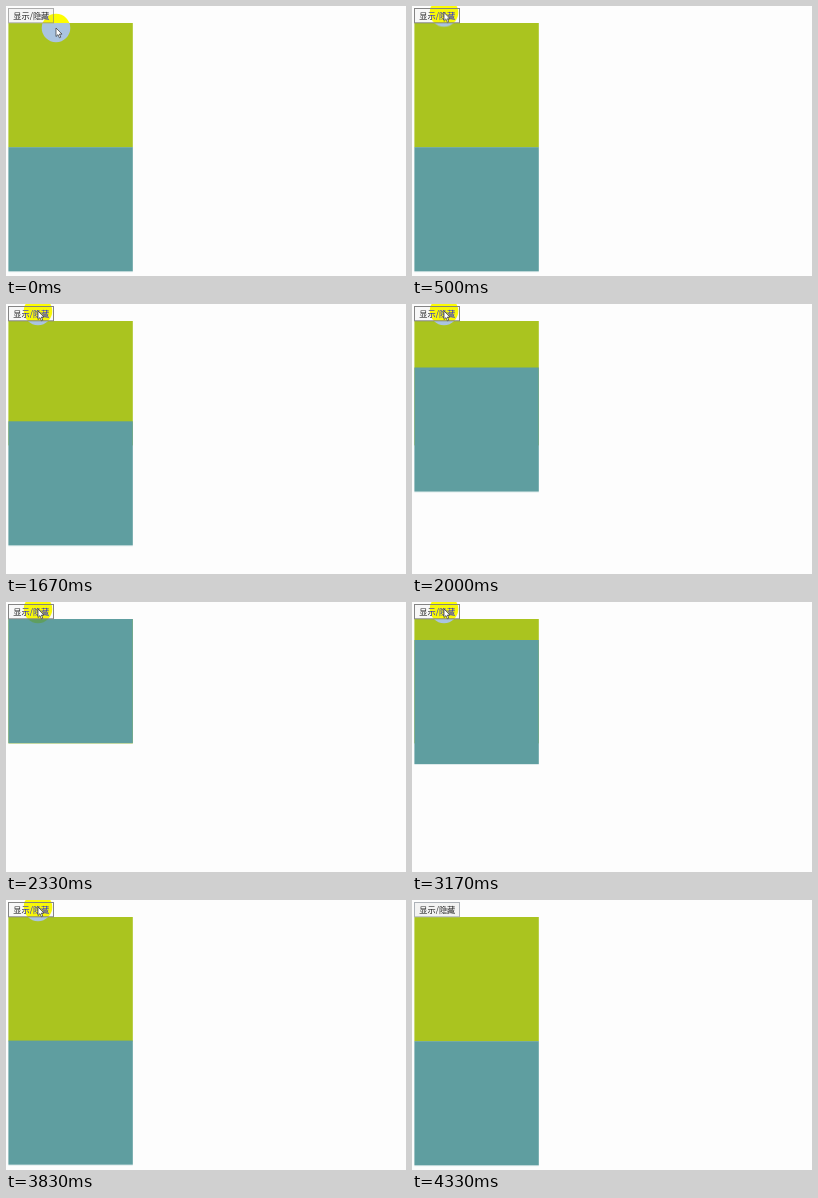
Animation, 400 px wide and 270 px high, one loop 5170 ms. Source, as an HTML page:

```html
<!DOCTYPE html>
<html lang="zh">
<head>
<meta charset="utf-8">
<title>显示/隐藏</title>
<style>
  html, body { margin: 0; width: 100%; height: 100%; overflow: hidden; background: #fdfdfd; }
  svg { display: block; width: 100%; height: 100%; }
  text { font: 8.2px "Noto Sans CJK SC", "Noto Sans CJK", sans-serif; fill: #222; }
  .panel { animation: slide 5170ms step-end infinite; }
  .button { animation: press 5170ms step-end infinite; }
  .pointer { animation: move 5170ms step-end infinite; }
  .spot { fill: #00f; mix-blend-mode: difference; }
  .arrow { fill: #fff; stroke: #333; stroke-width: .7; }

  /* The lower panel slides over the upper one and back. */
  @keyframes slide {
    0%, 100% { transform: translateY(124.2px); }
    29.013% { transform: translateY(122.5px); }
    32.301% { transform: translateY(100.3px); }
    35.396% { transform: translateY(65.5px); }
    38.684% { transform: translateY(46.5px); }
    41.972% { transform: translateY(14.5px); }
    45.067% { transform: translateY(0); }
    58.027% { transform: translateY(2.5px); }
    61.315% { transform: translateY(21px); }
    64.41% { transform: translateY(56.5px); }
    67.698% { transform: translateY(76px); }
    70.986% { transform: translateY(109.5px); }
    74.081% { transform: translateY(123.6px); }
    77.369% { transform: translateY(124.2px); }
  }
  @keyframes press {
    0%, 100% { fill: #f5f5f5; stroke: #adadad; }
    3.288%, 29.013%, 58.027% { fill: #f8f8f8; stroke: #858585; }
    25.725%, 54.738% { fill: #e8e8e8; stroke: #777; }
    77.369% { fill: #f3f3f3; stroke: #adb2b8; }
  }
  @keyframes move {
    0%, 100% { transform: translate(50px, 22px); }
    3.288% { transform: translate(39px, 11px); }
    6.382% { transform: translate(29px, 6px); }
    9.671% { transform: translate(32px, 6.5px); }
    12.959% { transform: translate(32px, 7px); }
    77.369% { transform: translate(121px, 110px); }
    80.657% { transform: translate(231px, 237px); }
    83.752% { transform: translate(-50px, -50px); }
  }
</style>
</head>
<body>
<svg viewBox="0 0 400 270">
  <rect width="400" height="270" fill="#fdfdfd"/>
  <rect x="2.4" y="17" width="124.4" height="124.4" fill="#aac41f"/>
  <rect class="panel" x="2.4" y="17" width="124.4" height="124.2" fill="#5f9ea0"/>
  <rect class="button" x="2.5" y="2.5" width="45" height="14.3"/>
  <text x="7.3" y="12.9">显示/隐藏</text>
  <circle class="pointer spot" r="14.3"/>
  <path class="pointer arrow" d="M0 0V8.5L2 6.6 3.4 9.8 4.8 9.2 3.4 6.1H6Z"/>
</svg>
</body>
</html>
```
